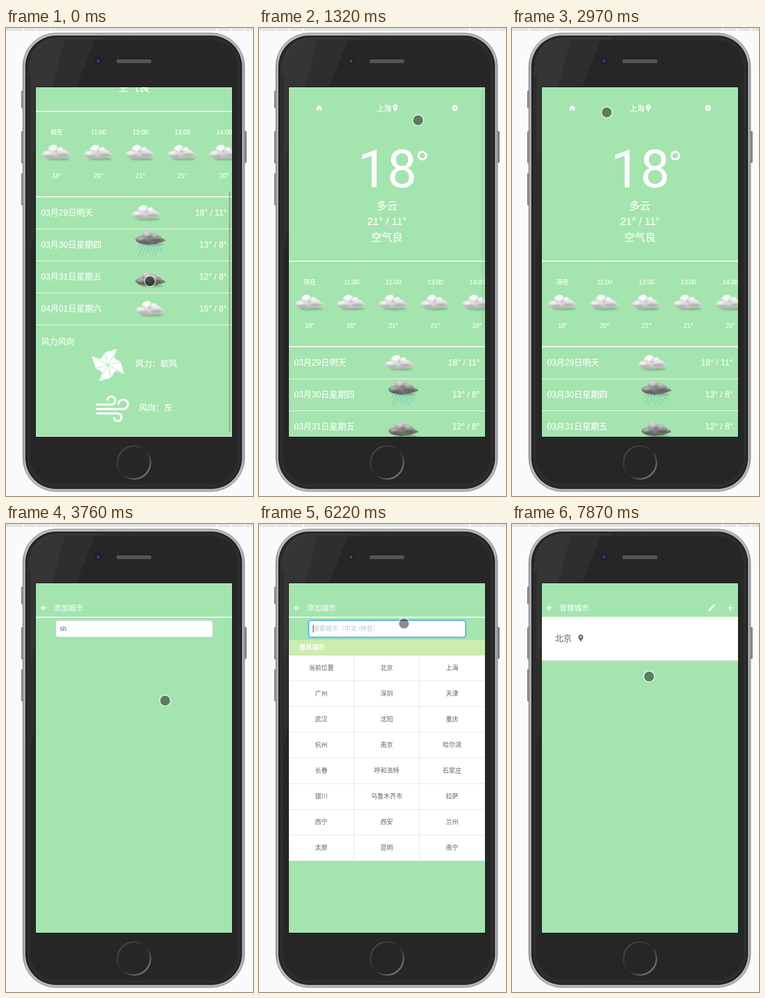
These frames come from a looping animation (472 by 893 pixels, 7.99 s). An HTML page:

```html
<!DOCTYPE html>
<html lang="zh-CN">
<head>
<meta charset="utf-8">
<title>Weather app</title>
<style>
html, body { margin: 0; width: 100%; height: 100%; overflow: hidden; background: #fafafa; }
svg { display: block; width: 100%; height: 100%; }
text { font: 12px "Liberation Sans", "Noto Sans CJK SC", "Noto Sans CJK", sans-serif; fill: #fff; white-space: pre; }
#home text { stroke: #fff; stroke-width: .2px; }
.f14 { font-size: 14px; }
.f16 { font-size: 16px; }
.f20 { font-size: 20px; }
.huge { font: 100px Roboto, sans-serif; }
.colon { font-family: "Noto Sans CJK JP", sans-serif; }
.mid { text-anchor: middle; }
.end { text-anchor: end; }
.ink { fill: #606266; }
.hint { fill: #c0c4cc; }
.typed { fill: #4f6a86; }
.bold { font-weight: bold; }
</style>
</head>
<body>
<svg viewBox="0 0 472 893">
  <defs>
    <linearGradient id="rim">
      <stop offset="0" stop-color="#989898"/><stop offset=".012" stop-color="#b9b9b9"/>
      <stop offset=".988" stop-color="#b4b4b4"/><stop offset="1" stop-color="#989898"/>
    </linearGradient>
    <linearGradient id="ring" x2="1" y2="1">
      <stop offset=".1" stop-color="#484848"/><stop offset=".42" stop-color="#2e2e2e"/>
      <stop offset=".52" stop-color="#252525"/><stop offset=".85" stop-color="#737373"/>
    </linearGradient>
    <linearGradient id="light" x2="0" y2="1">
      <stop offset="0" stop-color="#fcfcfc"/><stop offset=".55" stop-color="#e2e2e2"/><stop offset="1" stop-color="#a8aca8"/>
    </linearGradient>
    <linearGradient id="dark" x2="0" y2="1">
      <stop offset="0" stop-color="#d0d0d0"/><stop offset=".5" stop-color="#979797"/><stop offset="1" stop-color="#5c5c5c"/>
    </linearGradient>
    <pattern id="mesh" width="3" height="3" patternUnits="userSpaceOnUse">
      <path d="M0 0h1.5v1.5H0zM1.5 1.5H3V3H1.5z" fill="#6a6a6a"/>
    </pattern>
    <filter id="soft" x="-30%" y="-80%" width="160%" height="260%"><feGaussianBlur stdDeviation="1.4"/></filter>
    <clipPath id="screen"><path d="M57 113h375v667H57z"/></clipPath>
    <path id="puff" d="M-29 2C-27-3-21-5-17-5C-17-11-11-17-5-16C-1-16 1-13 2-10C6-13 12-12 13-7C17-7 21-4 21-1C25-1 28 2 29 4C24 6 20 7 16 8C10 12 4 9 0 11C-6 13-10 10-14 10C-20 10-27 7-29 2z"/>
    <ellipse id="shade" cx="3" cy="11" rx="22" ry="2.500" fill="#4f8a5c" opacity=".5" filter="url(#soft)"/>
    <g id="folds">
      <g filter="url(#soft)">
        <ellipse cx="11" cy="3" rx="11" ry="2.500" opacity=".4"/>
        <ellipse cx="-14" cy="5" rx="9" ry="2" opacity=".3"/>
        <ellipse cx="-1" cy="-3" rx="5" ry="2" opacity=".3"/>
      </g>
      <path d="M-17-5c4-2 7 0 8 3M2-10c-3 2-4 5-3 8M13-7c-4 0-6 2-7 4" fill="none" stroke="#777" opacity=".4"/>
    </g>
    <g id="shine" fill="#fff" filter="url(#soft)">
      <ellipse cx="-8" cy="-10" rx="6" ry="4"/>
      <ellipse cx="8" cy="-7" rx="4" ry="2.500"/>
      <ellipse cx="-19" cy="0" rx="6" ry="2.500"/>
    </g>
    <g id="cloud">
      <use href="#shade"/><use href="#puff" fill="url(#light)"/>
      <use href="#folds" fill="#808080"/><use href="#shine" opacity=".7"/>
    </g>
    <g id="storm">
      <use href="#shade"/><use href="#puff" fill="url(#dark)"/>
      <use href="#folds" fill="#222"/><use href="#shine" opacity=".35"/>
    </g>
    <path id="pin" d="M0-7a4.6 4.6 0 0 1 4.6 4.6C4.6 1 1.8 3 0 7C-1.8 3-4.6 1-4.6-2.4A4.6 4.6 0 0 1 0-7zM0-4.2a1.7 1.7 0 1 0 .01 0z" fill-rule="evenodd"/>
    <path id="back" d="M5 0H-4M0-4.2L-4.3 0L0 4.2" fill="none" stroke="#fff" stroke-width="2"/>
  </defs>

  <path d="M0 0h472v5.5H0z" fill="#e4e4e4"/>
  <path d="M33 0v6M58 0v6M85 0v6M403 0v6M430.500 0v6M456 0v6" stroke="#fff" stroke-width="2"/>

  <g id="phone">
    <g fill="#828282" stroke="#666" stroke-width=".6">
      <rect x="29.500" y="120" width="5" height="33" rx="1.500"/>
      <rect x="29.500" y="197" width="5" height="61" rx="1.500"/>
      <rect x="29.500" y="277" width="5" height="61" rx="1.500"/>
      <rect x="454.500" y="197" width="5" height="60" rx="1.500"/>
    </g>
    <rect x="32" y="9.500" width="424" height="875" rx="64" fill="url(#rim)" stroke="#8f8f8f"/>
    <rect x="37" y="14.500" width="414" height="865" rx="59" fill="#222"/>
    <rect x="40" y="17" width="408" height="860" rx="57" fill="#2d2d2d"/>
    <rect x="46.500" y="23" width="396" height="847" rx="51" fill="#262626"/>
    <g fill="#fff" fill-opacity=".035">
      <path d="M47 72Q50 24 97 23H112L88 112L47 262z"/>
      <path d="M47 72Q50 24 97 23H170L134 112L47 420z"/>
    </g>
    <path d="M44 90Q45 21 100 20H190" fill="none" stroke="#444" stroke-width="2.500" opacity=".6"/>
    <circle cx="176" cy="63" r="6.500" fill="#1b1b29"/>
    <circle cx="176" cy="63" r="3.600" fill="#17172d" stroke="#3c3a6b"/>
    <circle cx="176" cy="63" r="1.400" fill="#8585a5"/>
    <rect x="211" y="60" width="67" height="7" rx="3.500" fill="#404040"/>
    <rect x="211" y="60" width="67" height="7" rx="3.500" fill="url(#mesh)"/>
    <circle cx="244.500" cy="829" r="31.500" fill="none" stroke="url(#ring)" stroke-width="3"/>
    <path d="M56 112h377v669H56z" fill="#0c0c0c"/>
    <path d="M57 113h375v667H57z" fill="#a4e4ae"/>
  </g>

  <g clip-path="url(#screen)">
    <g id="home">
      <path d="M115 147l6.500 6H119.500v5h-3v-3.500h-3v3.500h-3v-5H108.500z" fill="#fff"/>
      <text class="f14" x="225" y="158">上海</text>
      <use href="#pin" x="260.500" y="153" fill="#fff"/>
      <g fill="none" stroke="#fff">
        <circle cx="374.500" cy="152.500" r="3.300" stroke-width="2.600"/>
        <circle cx="374.500" cy="152.500" r="4.900" stroke-width="2" stroke-dasharray="2.500 1.350"/>
        <circle cx="312" cy="243.500" r="7.300" stroke-width="3.800"/>
      </g>
      <text class="huge" x="189" y="304">18</text>
      <text class="f20 mid" x="244.500" y="346.500">多云</text>
      <text class="f20 mid" x="244.500" y="376">21° / 11°</text>
      <text class="f20 mid" x="244.500" y="406.500">空气良</text>
      <path d="M57 445h375M57 608h375" stroke="#fff" stroke-width="2"/>
      <g id="hours"></g>
      <g id="days"></g>
      <text class="f16" x="67" y="890">风力风向</text>
      <g id="mill" transform="translate(195 929)"></g>
      <text class="f16" x="247" y="932">风力<tspan class="colon">：</tspan>软风</text>
      <path d="M174 1004.500H201a7.700 7.700 0 1 0-7.500-9M174 1013H224a9 9 0 1 0-9-9.500M174 1021.500H213a7.300 7.300 0 1 1-6.500 9"
        fill="none" stroke="#fff" stroke-width="4" stroke-linecap="round"/>
      <text class="f16" x="254" y="1016">风向<tspan class="colon">：</tspan>东</text>
      <path d="M57 1065.500h375" stroke="#fff"/>
    </g>
    <rect id="bar" x="426" width="3" height="458" rx="1.500" fill="#808080"/>

    <g id="search">
      <use href="#back" x="72" y="160"/>
      <text class="f14" x="91" y="165">添加城市</text>
      <path d="M57 178h375" stroke="#fff" stroke-width="2"/>
      <rect id="glow" x="94.500" y="183.500" width="301" height="33" rx="5" fill="none" stroke="#409eff" stroke-opacity=".4" stroke-width="3"/>
      <rect id="field" x="95.500" y="184.500" width="299" height="31" rx="4" fill="#fff"/>
      <text id="input" x="103" y="204"></text>
      <path id="caret" d="M0 193v14" stroke="#333"/>
      <g id="list">
        <path d="M57 221h375v30H57z" fill="#cdecb0"/>
        <text class="bold" x="77" y="240">推荐城市</text>
        <path d="M57 251h375v392H57z" fill="#fff"/>
      </g>
    </g>

    <g id="manage">
      <use href="#back" x="72" y="160"/>
      <text class="f14" x="91" y="165">管理城市</text>
      <path d="M375 166.500l1-4l7-7l3 3l-7 7zM384 154.500l1.200-1.200q.8-.6 1.500 0l1.500 1.500q.6.800 0 1.500l-1.200 1.200z" fill="#fff"/>
      <path d="M411.500 160h11M417 154.500v11" stroke="#fff" stroke-width="2"/>
      <path d="M57 177h375v84H57z" fill="#fff"/>
      <path d="M57 260.500h375" stroke="#dcdfe6"/>
      <text class="f16 ink" x="82" y="224">北京</text>
      <use href="#pin" x="131.500" y="218" fill="#5b6b7f"/>
    </g>

    <g id="cursor">
      <circle r="9.500" fill-opacity=".45"/>
      <circle r="10.300" fill="none" stroke="#fff" stroke-opacity=".6" stroke-width="1.800"/>
    </g>
  </g>
</svg>
<script>
const LOOP = 7990;
const $ = id => document.getElementById(id);
const add = (id, markup) => $(id).insertAdjacentHTML('beforeend', markup);
const set = (id, attrs) => { for (const k in attrs) $(id).setAttribute(k, attrs[k]); };
const show = (id, on) => set(id, { display: on ? 'inline' : 'none' });
const clamp = v => Math.max(0, Math.min(1, v));

// Hourly forecast
const hours = [['现在', 18], ['11:00', 20], ['12:00', 21], ['13:00', 21], ['14:00', 20]];
hours.forEach(([label, deg], i) => {
  const x = 97 + 80 * i;
  add('hours', `<text class="mid" x="${x}" y="489">${label}</text>
    <use href="#cloud" x="${x}" y="525"/>
    <text class="mid" x="${x}" y="572">${deg}°</text>`);
});

// Daily forecast
const days = [
  ['03月29日明天', 'cloud', '18° / 11°', 269, 640],
  ['03月30日星期四', 'storm', '13° / 8°', 276, 688],
  ['03月31日星期五', 'storm', '12° / 8°', 276, 767],
  ['04月01日星期六', 'cloud', '16° / 8°', 276, 823]
];
days.forEach(([date, icon, range, x, y], i) => {
  const base = 644 + 61 * i;
  add('days', `<text class="f16" x="67" y="${base}">${date}</text>
    <use href="#${icon}" x="${x}" y="${y}"/>
    <text class="f16 end" x="422" y="${base}">${range}</text>
    <path d="M57 ${base + 25.5}h375" stroke="#fff"/>`);
});
let rain = '';
for (let i = 0; i < 14; i++) {
  const len = 9 + i * 5 % 8;
  rain += `M${257 + i * 3.1} ${698 + i * 7 % 14}l${-len * 0.4} ${len}`;
}
add('days', `<path d="${rain}" fill="none" stroke="#74bccb" stroke-width=".9"/>`);

// Pinwheel: white blades, then the creases between them
const blades = (d, style) => [0, 90, 180, 270].forEach(a =>
  add('mill', `<path d="${d}" transform="rotate(${a})" ${style}/>`));
blades('M0 0L-6-24L18-31L11-14L24-6z', 'fill="#fff"');
blades('M-6-24L0 0L18-31', 'fill="none" stroke="#a4e4ae"');

// Suggested cities
const cities = ('当前位置 北京 上海 广州 深圳 天津 武汉 沈阳 重庆 杭州 南京 哈尔滨 ' +
  '长春 呼和浩特 石家庄 银川 乌鲁木齐市 拉萨 西宁 西安 兰州 太原 昆明 南宁').split(' ');
cities.forEach((name, i) => {
  const x = 57 + 125 * (i % 3), y = 251 + 49 * Math.floor(i / 3);
  add('list', `<path d="M${x} ${y + 48.5}h124.500v-48.500" fill="none" stroke="#dfe2ea"/>
    <text class="mid ink" x="${x + 62}" y="${y + 28}">${name}</text>`);
});

// Bursts of screen updates: start, end, number of steps
const bursts = [
  [0, 0, 1], [530, 650, 2], [1080, 2020, 8], [2140, 2430, 3], [2700, 3610, 8], [3760, 4560, 7],
  [4860, 5240, 3], [5790, 5790, 1], [6100, 7030, 8], [7180, 7870, 6]
];

function held(t) {
  const [start, end, steps] = bursts.findLast(b => b[0] <= t);
  if (t >= end) return end;
  const gap = (end - start) / (steps - 1);
  return start + Math.min(steps - 1, Math.floor((t - start) / gap + 0.25)) * gap;
}

// Pointer path: time, x, y
const path = [
  [946, 275, 483], [1349, 304, 176], [2020, 197, 176], [2140, 141, 178], [2430, 266, 164],
  [2570, 266, 164], [2960, 181, 161], [3220, 115, 156], [3350, 115, 156], [3760, 304, 337],
  [4293, 184, 209], [5967, 184, 209], [6233, 277, 190], [6900, 250, 380], [7594, 262, 291]
];

function pointer(t) {
  const next = path.findIndex(p => p[0] > t);
  if (next === 0) return path[0].slice(1);
  if (next < 0) return path[path.length - 1].slice(1);
  const [t0, x0, y0] = path[next - 1], [t1, x1, y1] = path[next];
  const k = (t - t0) / (t1 - t0), e = k * k * (3 - 2 * k);
  return [x0 + (x1 - x0) * e, y0 + (y1 - y0) * e];
}

// Focus and the two deletions; each restarts the caret blink
const FOCUS = 4290, CUT = 5040, CLEAR = 5220, BLINK = 500;

function render(time) {
  const t = held(time);
  const page = t < 3340 ? 'home' : t < 7700 ? 'search' : 'manage';
  for (const id of ['home', 'search', 'manage']) show(id, id === page);

  const scroll = t < 530 ? 286 : t < 650 ? 130 : 0;
  set('home', { transform: `translate(0 ${-scroll})` });
  set('bar', { y: 116 + scroll * 197 / 286, opacity: 0.5 * (1 - clamp((t - 1080) / 420)) });

  const focus = t >= FOCUS;
  const typed = t < CUT ? 'sh' : t < CLEAR ? 's' : '';
  const touched = t < CUT ? FOCUS : t < CLEAR ? CUT : CLEAR;
  show('glow', focus);
  set('field', { stroke: focus ? '#409eff' : '#dcdfe6' });
  $('input').textContent = typed || '搜索城市（中文 /拼音）';
  set('input', { class: typed ? 'typed' : 'hint' });
  set('caret', { transform: `translate(${[103.5, 109.5, 116.5][typed.length]} 0)` });
  show('caret', focus && Math.floor((t - touched) / BLINK) % 2 === 0);
  show('list', t >= 6100);

  set('cursor', { transform: `translate(${pointer(t).join(' ')})` });
}

const begin = performance.now();
function tick() {
  render((performance.now() - begin) % LOOP);
  requestAnimationFrame(tick);
}
tick();
</script>
</body>
</html>
```
